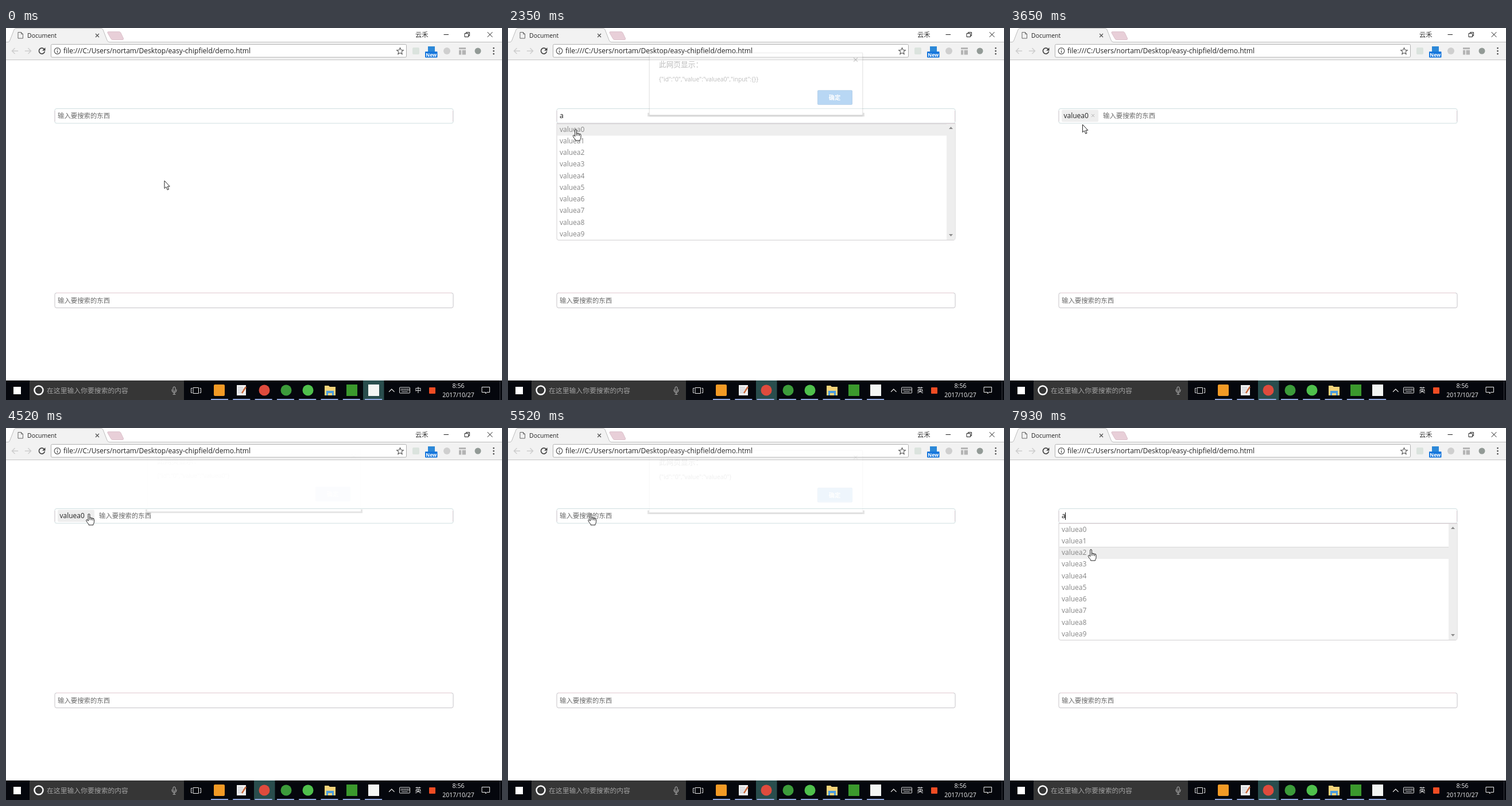
These frames come from a looping animation (864x648 px, 8000 ms). An HTML page:

```html
<!DOCTYPE html>
<html lang="zh-CN">
<head>
<meta charset="utf-8">
<title>Document</title>
<style>
  html, body { margin: 0; width: 100%; height: 100%; overflow: hidden; background: #fff; }
  svg { display: block; width: 864px; height: 648px; }
  text { font-family: 'Open Sans', 'Noto Sans CJK SC', 'Noto Sans CJK', sans-serif; white-space: pre; }
  .line { fill: none; stroke-linecap: square; }
  .hint { font-size: 11.4px; fill: #6a6a6a; }
  .item { font-size: 12px; fill: #858585; }
  .mid { text-anchor: middle; }
</style>
</head>
<body>
<svg viewBox="0 0 864 648">
  <defs>
    <filter id="shade" x="-5%" y="-5%" width="110%" height="120%">
      <feDropShadow dx="0" dy="1.5" stdDeviation="1.2" flood-color="#000" flood-opacity=".4"/>
    </filter>
    <g id="keys">
      <rect x=".5" y=".5" width="18" height="10" rx="1" fill="none"/>
      <path class="line" d="M3 3.5h14M3 5.5h14M5 8h9" stroke-dasharray="1 1.6"/>
    </g>
    <g id="mic">
      <rect x="-2" y="-6" width="4" height="8" rx="2"/>
      <path class="line" d="M-4-1v1a4 4 0 0 0 8 0v-1M0 4v3M-2 7h4"/>
    </g>
  </defs>

  <!-- window frame -->
  <rect width="864" height="648" fill="#fff"/>
  <rect y="24" width="864" height="31" fill="#f2f2f2"/>
  <path d="M0 24.5H4Q6 24 7 21L14 3Q15 .5 18 .5H165Q168 .5 169 3L176 21Q177 24.5 180 24.5H864" fill="#f2f2f2" stroke="#bdbdbd"/>
  <path d="M0 55.5H864" stroke="#c4c4c4"/>
  <path d="M179 6.500H197Q199 6.500 200 8.500L204.500 18Q205 20.500 203 20.500H186Q183.500 20.500 182.500 18L177 8.500Q176 6.500 179 6.500Z" fill="#e8cfd8" stroke="#dcc2cc"/>
  <path class="line" d="M21.500 7.500h5l3 3v7.500h-8zM26.500 7.500v3h3" fill="#fff" stroke="#666"/>
  <text x="37" y="16.500" font-size="10.500" fill="#222">Document</text>
  <path class="line" d="M156.500 10.500l5 5m0-5l-5 5" stroke="#555" stroke-width="1.300"/>
  <text x="713" y="16" font-size="11.300" fill="#333">云禾</text>
  <g class="line" stroke="#222">
    <path d="M763 11.500h7.500"/>
    <path d="M799.500 9.500h6v6h-6zM801.500 9v-1.500h6v6h-2"/>
    <path d="M839 7.500l8 8m0-8l-8 8"/>
  </g>

  <!-- toolbar -->
  <g class="line" stroke-width="1.400">
    <path d="M10.500 40h10M15 35.500l-4.500 4.500 4.500 4.500M33.500 40h10M39 35.500l4.500 4.500-4.500 4.500" stroke="#cdcdcd"/>
    <path d="M66.500 37a5 5 0 1 0 .7 4.500" stroke="#444" stroke-width="1.700"/>
  </g>
  <path d="M68.500 34v5.500h-5.500z" fill="#444"/>
  <rect x="78.500" y="28.500" width="619" height="22.500" rx="2" fill="#fff" stroke="#b0b0b0"/>
  <circle cx="89.500" cy="40" r="5.300" fill="none" stroke="#555" stroke-width="1.200"/>
  <path d="M89.500 36.500v1.500M89.500 39.200v4" stroke="#555" stroke-width="1.300"/>
  <text x="100" y="44" font-size="12.080" fill="#222">file:///C:/Users/nortam/Desktop/easy-chipfield/demo.html</text>
  <path d="M686.500 34.500l1.700 3.800 4.100.4-3.100 2.700.9 4.100-3.600-2.200-3.600 2.200.9-4.100-3.100-2.700 4.100-.4z" fill="none" stroke="#555" stroke-width="1.100"/>
  <rect x="708" y="34" width="12" height="12" rx="2" fill="#dbe3de"/>
  <rect x="735" y="32" width="12" height="10" fill="#2c88d8"/>
  <rect x="730" y="41" width="21.500" height="10.500" rx="1" fill="#1677dd"/>
  <text class="mid" x="740.800" y="49.500" font-size="8.500" font-weight="700" fill="#fff">New</text>
  <circle cx="768" cy="40" r="6" fill="#cfcfcf"/>
  <path d="M789 34h12v3h-12zM789 38.500h4v8h-4zM794.500 38.500h6.500v8h-6.500z" fill="#b4b4b4"/>
  <circle cx="822" cy="40" r="5.500" fill="#929a96"/>
  <path d="M849.500 35v.1M849.500 40v.1M849.500 45v.1" stroke="#444" stroke-width="2.600" stroke-linecap="round"/>

  <!-- page -->
  <rect x="85" y="140.500" width="694" height="25.500" rx="3" fill="#fff" stroke="#cfdfe0"/>
  <path d="M85 144v19M778.500 144v19" stroke="#dccdd4"/>
  <rect x="85" y="461.500" width="694" height="26" rx="3" fill="#fff" stroke="#c6c3c8"/>
  <path d="M88 461.500H776" stroke="#e2c9d0"/>
  <text class="hint" x="90" y="478.500">输入要搜索的东西</text>
  <g id="tag">
    <rect x="90" y="142.500" width="64" height="21" rx="2" fill="#eee"/>
    <text x="93.500" y="157" font-size="12" fill="#222">valuea0</text>
    <path class="line" d="M142.500 150.500l4 4m0-4l-4 4" stroke="#aaa"/>
  </g>
  <text id="hint" class="hint" y="157">输入要搜索的东西</text>
  <text id="typed" x="90" y="157" font-size="12" fill="#111">a</text>
  <path id="caret" d="M.5 147v13" stroke="#111"/>
  <g id="list">
    <path d="M85 166V366Q85 369.500 88 369.500H776Q779 369.500 779 366V166Z" fill="#fff" stroke="#d2d0d2"/>
    <path d="M85 166.500H779" stroke="#dccfd4"/>
    <g id="hover">
      <rect x="86" width="678" height="20.500" fill="#eee"/>
      <path d="M86 0H764" stroke="#d8d8d8"/>
    </g>
    <rect x="764" y="167" width="14.500" height="202" fill="#eee"/>
    <path d="M768 176h7l-3.500-4zM768 359h7l-3.500 4z" fill="#8c8c8c"/>
    <g id="rows"></g>
  </g>

  <!-- message box; its lower edge stays visible while the body fades -->
  <path id="edge" class="line" d="M244.500 157V160.500H619.500V157" stroke="#000" stroke-opacity=".1" stroke-width="3"/>
  <g id="box">
    <rect x="246.500" y="51" width="371" height="108.500" fill="#fff" stroke="#b5b5b5" filter="url(#shade)"/>
    <text x="263" y="75.500" font-size="12.700" fill="#222">此网页显示：</text>
    <text id="msg" x="263" y="101" font-size="10.300" fill="#222"></text>
    <path class="line" d="M602.500 60l6 6m0-6l-6 6" stroke="#666" stroke-width="1.300"/>
    <rect x="539.500" y="116.500" width="60" height="24.500" rx="1" fill="#127bdc" stroke="#0a62b8"/>
    <rect id="press" x="541" y="118" width="57" height="21.500" fill="none" stroke="#5ba4ea"/>
    <text class="mid" x="569" y="132.500" font-size="10.300" font-weight="700" fill="#fff">确定</text>
  </g>

  <!-- taskbar -->
  <rect y="614" width="864" height="34" fill="#05070d"/>
  <rect x="13" y="625" width="13" height="13" fill="#fff"/>
  <rect x="41" y="614" width="269" height="34" fill="#363636"/>
  <circle cx="57" cy="631" r="7.500" fill="none" stroke="#fff" stroke-width="2.500"/>
  <text x="71" y="636" font-size="11.830" fill="#a2a2a2">在这里输入你要搜索的内容</text>
  <use href="#mic" x="293" y="631" fill="none" stroke="#b5b5b5"/>
  <path class="line" d="M326.500 626.500h9v10h-9zM324 627.500h-1.500v8h1.500M338 627.500h1.500v8h-1.500" stroke="#e8e8e8"/>
  <rect id="active" y="614" width="36.500" height="34" fill="#294d4d"/>
  <g id="marks" fill="#8fa6dd"></g>
  <rect x="362" y="621" width="19" height="20" rx="2" fill="#f29a25"/>
  <path d="M402 622h16v18h-16z" fill="#f1f1f1"/>
  <path d="M404 626h9M404 629h10M404 632h7M404 635h9" stroke="#b8bcc8"/>
  <path d="M418 625l-7 11" stroke="#c9683c" stroke-width="2.500"/>
  <circle cx="450" cy="631" r="9.500" fill="#de4b3d"/>
  <circle cx="488" cy="631" r="9.500" fill="#3c9b3a"/>
  <circle cx="526" cy="631" r="9.500" fill="#4fc04c"/>
  <path d="M555 623h7l2 2h10v15h-19z" fill="#f3d37a"/>
  <path d="M558 632h13v8h-3v-4h-7v4h-3z" fill="#4a9ce0"/>
  <rect x="593" y="621" width="19" height="20" fill="#3b992d"/>
  <rect x="631" y="621" width="19" height="20" fill="#f4f6f4"/>
  <path class="line" d="M667.500 633.500l4.300-4.300 4.300 4.300" stroke="#eee" stroke-width="1.200"/>
  <use href="#keys" x="685" y="625.500" stroke="#ddd"/>
  <text id="mode" class="mid" x="718" y="635" font-size="11" font-weight="500" fill="#fff"></text>
  <rect x="737" y="626" width="11" height="11" rx="1" fill="#f04c23"/>
  <g class="mid" font-size="10.500" fill="#f2f2f2">
    <text x="788" y="627">8:56</text>
    <text x="788" y="643">2017/10/27</text>
  </g>
  <path class="line" d="M829.500 625.500h13v9h-5l-2 2.500v-2.500h-6z" stroke="#eee"/>
  <path d="M860.500 614v34" stroke="#3b3d42"/>

  <!-- input method bar -->
  <g id="ime" fill="#1a78c6">
    <rect x="728" y="594.500" width="140" height="19" fill="#fff" stroke="#c9d9e8"/>
    <rect x="709" y="593" width="20" height="20" rx="2" fill="#f04c23"/>
    <text class="mid" x="742" y="608.500" font-size="12.500" font-weight="700">英</text>
    <circle cx="758.500" cy="602.500" r="1.500"/>
    <path d="M763 604.500h2.300l-1.600 4h-1.200z"/>
    <use href="#mic" x="779.500" y="603" stroke="#1a78c6"/>
    <rect x="791.500" y="599" width="13.500" height="9.500" rx="1"/>
    <path d="M793 602h11M793 604.500h11M795 607h6" stroke="#fff" stroke-dasharray="1.500 1"/>
    <g fill="#b7c1ca"><circle cx="817" cy="600.500" r="2.800"/><path d="M812 609q0-5 5-5t8 5z"/></g>
    <path d="M833 598.500q2.500 2 5 0l4 2.500-1.500 3-2-1v7h-6.500v-7l-2 1-1.500-3z"/>
    <path d="M849 608.500l6-6" stroke="#1a78c6" stroke-width="2.600" stroke-linecap="round"/>
    <path class="line" d="M858 600.500a3.500 3.500 0 1 1-3-2" stroke="#1a78c6" stroke-width="2"/>
  </g>

  <!-- pointers, hot spot at 0,0 -->
  <g id="arrow" fill="#fff" stroke="#222"><path d="M0 0V13.500L3 10.800 5.300 16 7.500 15 5.300 10H9.300Z"/></g>
  <g id="beam" class="line" stroke="#222" stroke-width="1.200"><path d="M-3-6.500h2l1 1 1-1h2M0-5.500v11M-3 6.500h2l1-1 1 1h2"/></g>
  <g id="hand" fill="#fff" stroke="#222" stroke-linejoin="round">
    <path d="M-1.300 12V1Q-1.300-.4 0-.4T1.400 1V6.500Q3 5.500 4 7 5.500 6 6.500 7.500 9 7 9 9.500V13.500Q9 16 7.500 17.500V19H-.5V17.500Q-3.500 14.500-4.700 11.500-5 9.500-3.200 9.700-2 10.300-1.300 12Z"/>
    <path class="line" d="M1.400 6.500v3.500M4 7v3M6.500 7.500v3"/>
  </g>
</svg>
<script>
const LOOP = 8000, ROW = 20.25, TOP = 167;
const $ = id => document.getElementById(id);
const show = (id, on) => $(id).setAttribute('visibility', on ? 'visible' : 'hidden');
const move = (id, x, y) => $(id).setAttribute('transform', `translate(${x} ${y})`);
const within = (t, spans) => spans.some(([a, b]) => t >= a && t < b);

for (let i = 0; i < 10; i++)
  $('rows').innerHTML += `<text class="item" x="90" y="${180.5 + i * ROW}">valuea${i}</text>`;
for (let i = 0; i < 8; i++)
  $('marks').innerHTML += `<rect x="${357 + i * 38.3}" y="646" width="30" height="2"/>`;

// time, x, y of the pointer
const path = [
  [0, 276, 266], [60, 275.500, 266], [150, 273, 265], [310, 273, 265],
  [1080, 132, 151], [1820, 132, 151], [2160, 118, 177], [3400, 118, 177],
  [4010, 141, 153], [4260, 144.500, 150], [7260, 144.500, 150], [7930, 141, 212]
];
const shapes = [[0, 'arrow'], [980, 'beam'], [1990, 'hand'], [3420, 'arrow'], [3720, 'beam'],
  [4040, 'hand'], [5710, 'beam'], [7450, 'hand']];
const carets = [[1140, 2060], [5710, 6370], [6700, 7260], [7790, LOOP]];
const typing = [[1530, 3230], [6700, LOOP]];
const lists = [[1590, 3230], [6930, LOOP]];
const imes = [[1170, 1880], [5970, 7320]];
const tags = [[3230, 5370]];
const boxes = [
  { open: 2320, press: 3070, close: 3260, text: '{"id":"0","value":"valuea0","input":{}}' },
  { open: 4520, press: 5070, close: 5400, text: '{"id":"0","value":"valuea0"}' }
];

function pointerAt(t) {
  const i = path.findIndex(p => p[0] > t);
  if (i < 0) return path[path.length - 1].slice(1);
  const [t0, x0, y0] = path[i - 1], [t1, x1, y1] = path[i];
  const p = (t - t0) / (t1 - t0), e = p * p * (3 - 2 * p);
  return [x0 + (x1 - x0) * e, y0 + (y1 - y0) * e];
}

function drawBox(t) {
  const b = boxes.find(b => t >= b.open && t < b.close + 150);
  show('box', b);
  show('press', b && t >= b.press);
  show('edge', false);
  if (!b) return;
  const step = from => Math.floor((t - from) / 30);
  let dy, alpha;
  if (t < b.close) {
    const p = Math.min(1, (step(b.open) + 1) / 6);
    dy = -22 * (1 - p) ** 2.600;
    alpha = Math.min(1, (p - .16) * 1.700);
  } else {
    const p = step(b.close) / 5;
    dy = -15 * p;
    alpha = (1 - p) ** 1.700;
  }
  $('msg').textContent = b.text;
  $('box').setAttribute('opacity', alpha);
  show('edge', alpha < 1);
  move('box', 0, dy);
  move('edge', 0, dy);
}

function draw(t) {
  const [x, y] = pointerAt(t);
  const shape = shapes.filter(s => s[0] <= t).pop()[1];
  for (const id of ['arrow', 'beam', 'hand']) show(id, id === shape);
  move(shape, x, y);

  const typed = within(t, typing), list = within(t, lists), tag = within(t, tags);
  show('tag', tag);
  show('typed', typed);
  show('hint', !typed);
  $('hint').setAttribute('x', tag ? 162 : 90);
  show('caret', within(t, carets));
  move('caret', typed ? 96 : 90, 0);
  show('list', list);
  show('hover', list && y >= TOP);
  move('hover', 0, TOP + Math.max(0, Math.floor((y - TOP) / ROW)) * ROW);

  drawBox(t);
  show('ime', within(t, imes));
  $('mode').textContent = t < 1170 ? '中' : '英';
  $('active').setAttribute('x', t < 120 ? 622 : 432);
}

const start = performance.now();
function tick() {
  draw((performance.now() - start) % LOOP);
  requestAnimationFrame(tick);
}
tick();
</script>
</body>
</html>
```
